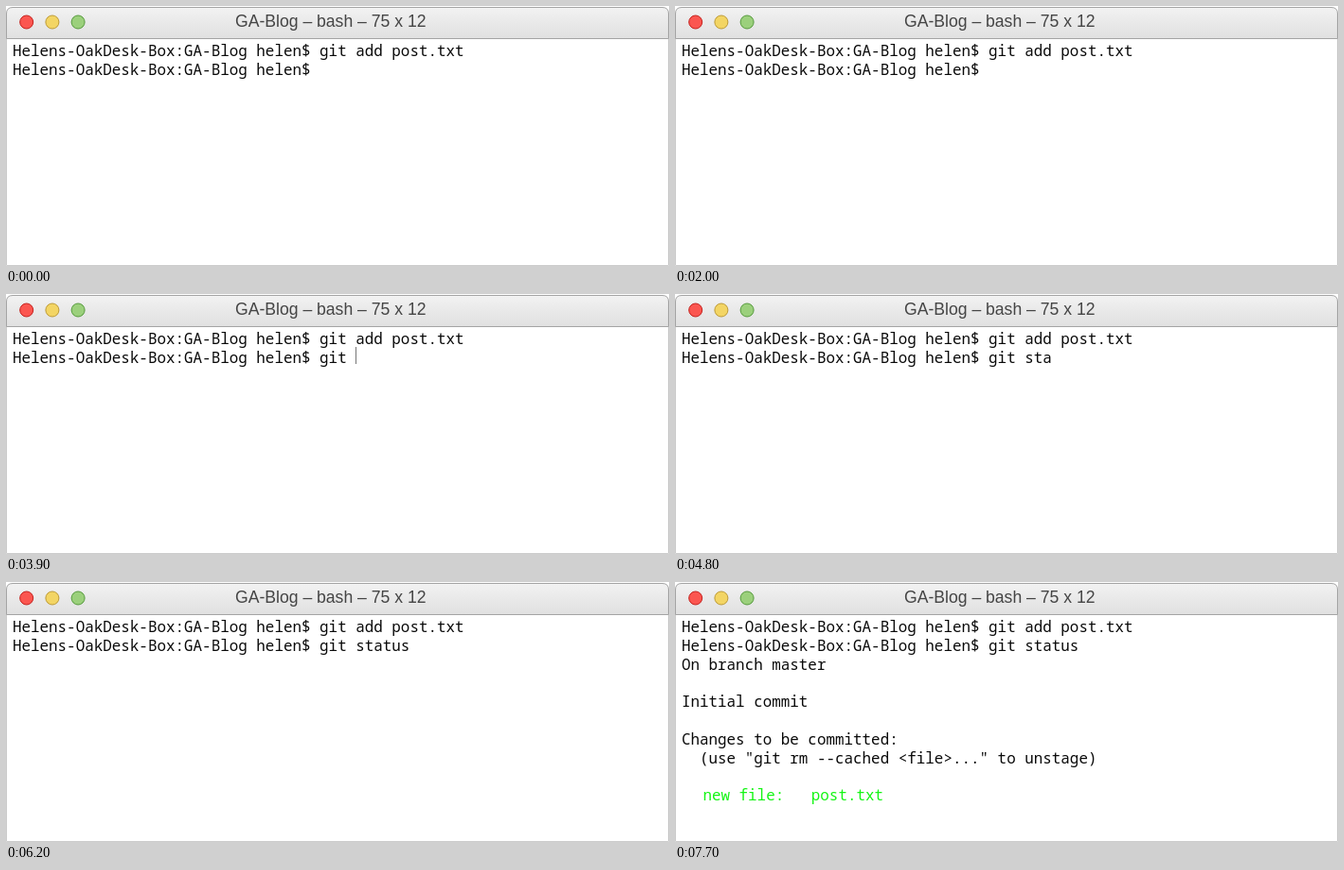
Write an HTML page that moves like this. It is 700 by 275 pixels and loops after 8 s.

```html
<!DOCTYPE html>
<html lang="en">
<head>
<meta charset="utf-8">
<title>Terminal</title>
<style>
  html, body { margin: 0; width: 100%; height: 100%; overflow: hidden; background: #fff; }
  svg { display: block; }
  .term { font: 15.9px "Noto Sans Mono", "DejaVu Sans Mono", monospace; fill: #0a0a0a; }
  .title { font: 17.6px "Liberation Sans", Arial, sans-serif; fill: #454545; }
  .term .staged { fill: #14f514; }
</style>
</head>
<body>
<svg width="700" height="275" viewBox="0 0 700 275">
  <defs>
    <linearGradient id="bar" x1="0" y1="0" x2="0" y2="1">
      <stop offset="0" stop-color="#f2f2f2"/>
      <stop offset="1" stop-color="#e0e0e0"/>
    </linearGradient>
  </defs>
  <path d="M.5 8V274.5H699.5V8" fill="#fff" stroke="#cbcbcb"/>
  <path d="M.5 34.5V8Q.5 1.5 7 1.5H693Q699.5 1.5 699.5 8V34.5Z" fill="url(#bar)" stroke="#a4a4a4"/>
  <g id="lights"></g>
  <text class="title" x="242" y="22">GA-Blog – bash – 75 x 12</text>
  <g id="screen" class="term"></g>
  <rect id="cursor" y="56" width="1" height="18" fill="#777"/>
</svg>
<script>
  const LOOP = 8000, BLINK = 500, KEY = 200, OUTPUT_AT = 7700;
  const LEFT = 6.9, ADVANCE = 15.9 * 0.6;
  const FIRST_BASELINE = 53, LINE = 19.8;
  const PROMPT = "Helens-OakDesk-Box:GA-Blog helen$ ";

  // Each burst types one entry per key interval.
  const BURSTS = [
    { at: 2500, keys: ["g", "i", "t"] },
    { at: 3900, keys: [" "] },
    { at: 4400, keys: ["s", "t", "a", "tu", "s"] }
  ];
  const STROKES = BURSTS.flatMap(({ at, keys }) => keys.map((text, i) => ({ at: at + i * KEY, text })));

  const OUTPUT = [
    "On branch master",
    "",
    "Initial commit",
    "",
    "Changes to be committed:",
    '  (use "git rm --cached <file>..." to unstage)'
  ];
  const LIGHTS = [["#fb5650", "#c4211d"], ["#f3d564", "#bd9a35"], ["#9bd07c", "#559a3c"]];

  const $ = id => document.getElementById(id);
  const show = (node, on) => node.setAttribute("visibility", on ? "visible" : "hidden");
  // Non-breaking spaces keep runs of blanks intact.
  const write = (node, text) => { node.textContent = text.replace(/ /g, "\u00a0"); };

  function add(parent, tag, attrs = {}) {
    const node = document.createElementNS("http://www.w3.org/2000/svg", tag);
    for (const key in attrs) node.setAttribute(key, attrs[key]);
    return parent.appendChild(node);
  }

  function addLine(parent, row, text, x = LEFT, cls = "") {
    const node = add(parent, "text", { x, y: Math.round(FIRST_BASELINE + row * LINE), class: cls });
    write(node, text);
    return node;
  }

  LIGHTS.forEach(([fill, stroke], i) =>
    add($("lights"), "circle", { cx: 21.7 + 27.2 * i, cy: 17, r: 7, fill, stroke }));

  addLine($("screen"), 0, PROMPT + "git add post.txt");
  const input = addLine($("screen"), 1, PROMPT);
  const output = add($("screen"), "g");
  OUTPUT.forEach((text, i) => addLine(output, i + 2, text));
  addLine(output, 9, "new file:   post.txt", 29.4, "staged");

  function draw() {
    const t = performance.now() % LOOP;
    const pressed = STROKES.filter(stroke => stroke.at <= t);
    const last = pressed[pressed.length - 1] || { at: 0, text: "" };
    const line = PROMPT + pressed.map(stroke => stroke.text).join("");
    const done = t >= OUTPUT_AT;
    const blinkOn = Math.floor((t - last.at) / BLINK) % 2 === 1;

    write(input, line);
    $("cursor").setAttribute("x", Math.round(LEFT + line.length * ADVANCE));
    show($("cursor"), !done && (blinkOn || last.text === " "));
    show(output, done);
    requestAnimationFrame(draw);
  }
  draw();
</script>
</body>
</html>
```
